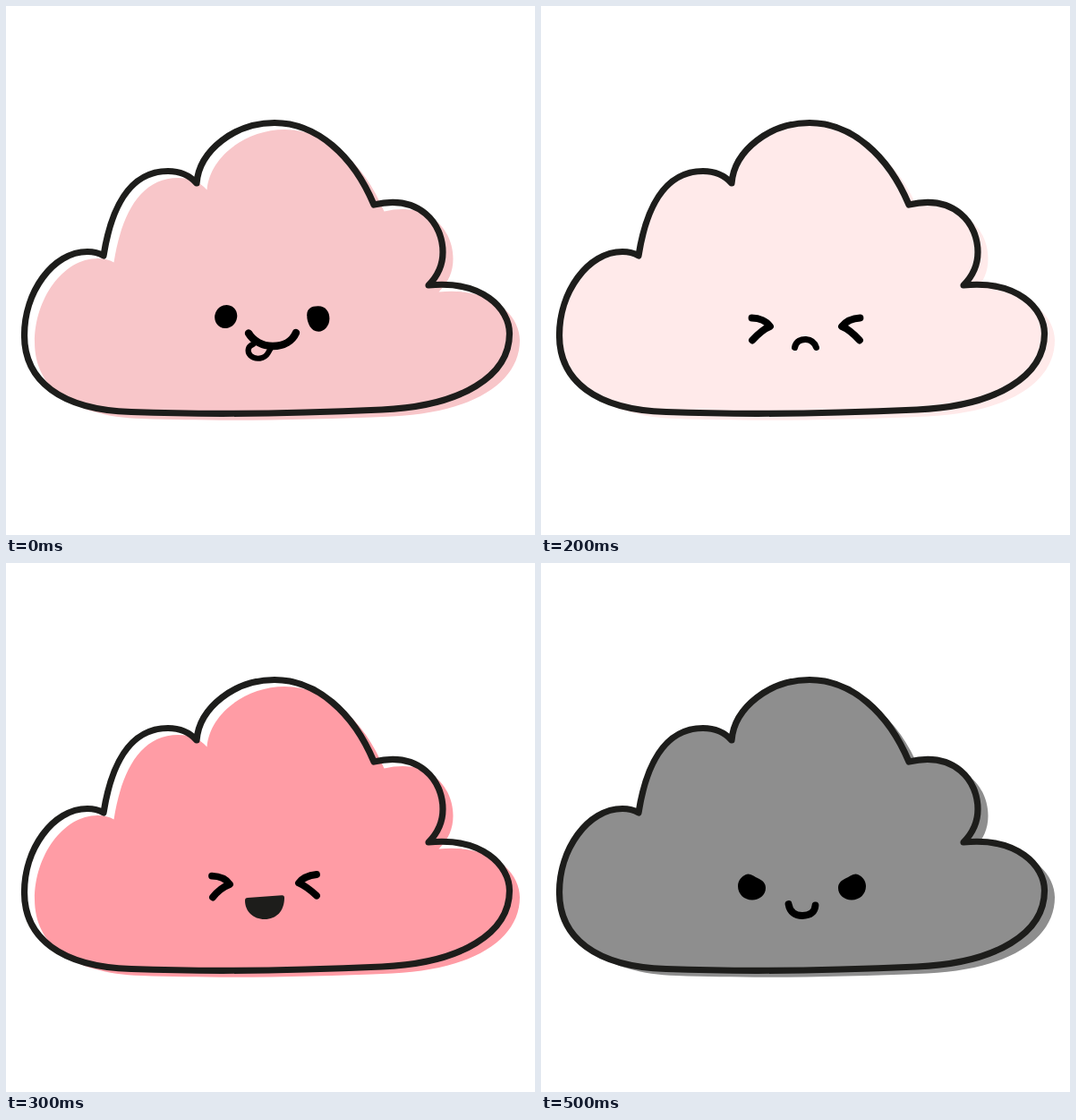
Write an HTML page that moves like this. It is 591x591 px and loops after 600 ms.

```html
<!DOCTYPE html>
<html lang="en">
<head>
<meta charset="utf-8">
<title>Moody cloud</title>
<style>
  html, body { margin: 0; width: 100%; height: 100%; overflow: hidden; background: #fff; }
  svg { display: block; width: 100%; height: 100%; }
  .edge { fill: none; stroke: #1d1d1b; stroke-width: 7.2; stroke-linejoin: round; }
  .line { fill: none; stroke: #000; stroke-width: 7.8; stroke-linecap: round; stroke-linejoin: round; }
  .mood { opacity: 0; }
</style>
</head>
<body>
<svg viewBox="0 0 591 591">
  <defs>
    <path id="cloud" d="M109 279C104 276 98 274.500 91 274.500C52 274.500 20.500 320 20.500 368
      C20.500 418 60 451 140 453.500C220 456.500 320 455.500 420 451C510 447 562.500 413 562.500 366
      C562.500 338 532 306 472 312C483 301 488 289 488 275C488 243 462 210 411 222
      C388 167 347 130.500 300 130.500C256 130.500 216 161 213 198C204 188 194 184.500 181 184.500
      C137 184.500 117 228 109 279Z"/>
    <ellipse id="eyeL" rx="12.300" ry="13.200" transform="rotate(30)"/>
    <path id="eyeR" d="M0-14C9-14 12.700-7 12.700 0C12.700 8 7 14.500 .5 14.500
      C-8 14.500-12.500 5-12.500-4C-12.500-11-8-14 0-14Z"/>
    <path id="glare" d="M229 348C233 346 238 350 243 352.500C248 355 251 358 251 363
      C251 371 244 376.500 236 376.500C227 376.500 220 370 220 361C220 355 224 350 229 348Z"/>
  </defs>

  <use id="tint" href="#cloud" x="11.500" y="7.500"/>
  <use id="inner" href="#cloud"/>
  <use class="edge" href="#cloud"/>

  <g class="mood">
    <use href="#eyeL" x="245.700" y="347"/>
    <use href="#eyeR" x="348.700" y="349.300"/>
    <path class="line" stroke-width="6" style="stroke-width:6.200"
      d="M276 378C270 380 269 386 273 390.500C279 396 289 394 292.500 388L296 382"/>
    <path class="line" style="stroke-width:8.400" d="M271 365.500C276 374 286 380 298 380C311 380 320 374 324 365"/>
  </g>

  <g class="mood">
    <use href="#eyeL" x="253" y="340.300"/>
    <use href="#eyeR" x="351.500" y="342.700"/>
    <path class="line" style="stroke-width:7.200" d="M291 360.500C293 367.500 297 370 303 370C310 370 314.500 367 314.500 361.500"/>
  </g>

  <g class="mood line">
    <path d="M235.500 348.500C244 348.500 252 352 256 358C248 361 242 367 236 373.500"/>
    <path d="M356.500 348.500C347 349 341 352 336 358C344 361 350 367 356 373.500"/>
    <path style="stroke-width:7" d="M283.500 381.500C285 374 291 372.300 296 372.500C303 373 306 377 307.500 381.500"/>
  </g>

  <g class="mood">
    <g class="line">
      <path d="M230 349.700C239 350 246 353 250 359C242 362 236 367 231 373.500"/>
      <path d="M347 348C338 349 331 352 327 357.500C335 361 341 366 347 371.700"/>
    </g>
    <path fill="#1d1d1b" d="M267 377Q267 374 270 374L308 371.300Q311 371 311 374
      C311 389 302 398 289 398C276 398 267 389 267 377Z"/>
  </g>

  <g class="mood">
    <use href="#eyeL" transform="translate(236.500 350.500) scale(1.060)"/>
    <use href="#eyeR" transform="translate(346.500 353) scale(1.070)"/>
    <path class="line" style="stroke-width:8.200" d="M275 375.500C275 388 277 391 282 391C287 391 290 387 292 385
      C295 388 298 389.500 302 389.300C307 389 308 383 308 373.500"/>
  </g>

  <g class="mood">
    <use href="#glare"/>
    <use href="#glare" transform="translate(583 0) scale(-1 1)"/>
    <path class="line" d="M276.500 381C278 390 284 394 292 394C301 394 306 390 306.500 382.500"/>
  </g>
</svg>
<script>
  const STEP = 100;
  // cloud colour, and whether it also fills the outline
  const looks = [
    ['#f8c6c9', false],
    ['#e8c3d4', false],
    ['#ffeaea', true],
    ['#ff9ca5', false],
    ['#ffb7c8', false],
    ['#8e8e8e', true]
  ];
  const count = looks.length;

  function play(el, prop, values) {
    const keys = values.map((v, i) => ({ [prop]: v, offset: i / count, easing: 'step-end' }));
    keys.push({ [prop]: values[count - 1], offset: 1 });
    el.animate(keys, { duration: STEP * count, iterations: Infinity });
  }

  play(document.getElementById('tint'), 'fill', looks.map(l => l[0]));
  play(document.getElementById('inner'), 'fill', looks.map(l => l[1] ? l[0] : 'transparent'));
  document.querySelectorAll('.mood').forEach((el, i) =>
    play(el, 'opacity', looks.map((_, j) => +(i === j))));
</script>
</body>
</html>
```
